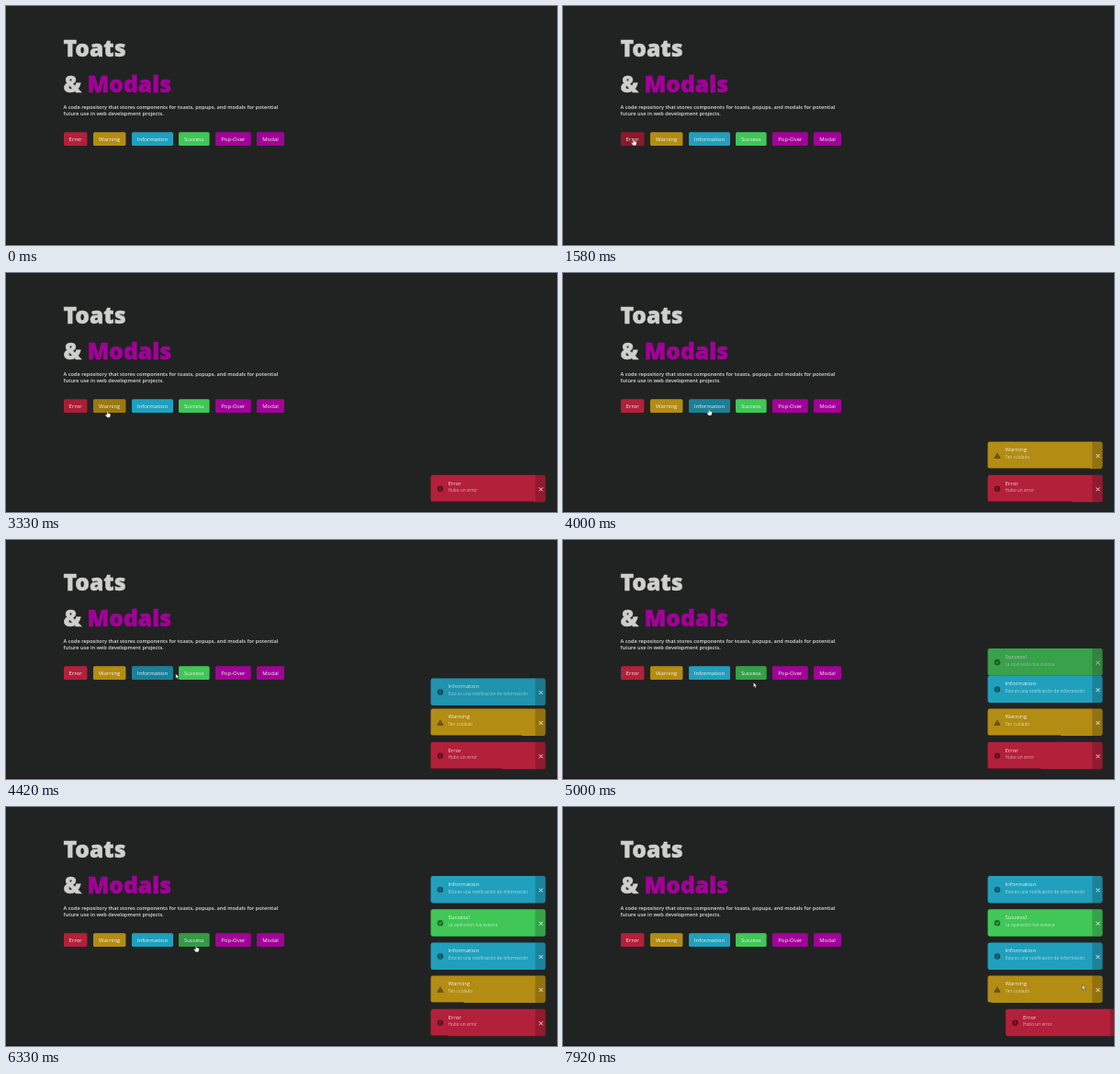
Recreate the animation shown at these times as an HTML page. Size 600 by 260 pixels, loop 8000 ms.

```html
<!DOCTYPE html>
<html lang="en">
<head>
<meta charset="utf-8">
<title>Toats &amp; Modals</title>
<style>
  html, body { margin: 0; width: 100%; height: 100%; overflow: hidden; background: #212322; }
  svg { display: block; width: 100vw; height: 100vh; font-family: "Open Sans", "Noto Sans", sans-serif; }
  .title { font-size: 24.6px; font-weight: 800; fill: #cfcfcd; stroke: #cfcfcd; stroke-width: .5; }
  .title .accent { fill: #a30099; stroke: #a30099; }
  .intro { font-size: 5.62px; font-weight: 600; fill: #dededc; }
  .btn { font-size: 6px; font-weight: 500; fill: #f2f2f2; text-anchor: middle; }
  .head { font-size: 6.1px; fill: #fff; fill-opacity: .88; }
  .body { font-size: 4.75px; fill: #fff; fill-opacity: .62; }
</style>
</head>
<body>
<svg id="stage" viewBox="0 0 600 260">
  <rect width="600" height="260" fill="#212322"/>
  <rect y="258.6" width="600" height="1.4" fill="#1d1b1a"/>
  <text class="title" x="62.5" y="55.4">Toats</text>
  <text class="title" x="62.5" y="94.4">&amp; <tspan class="accent">Modals</tspan></text>
  <text class="intro" x="62.6" y="111.8">A code repository that stores components for toasts, popups, and modals for potential</text>
  <text class="intro" x="62.6" y="119">future use in web development projects.</text>
</svg>
<script>
const LOOP = 8000, STEP = 1000 / 12;
const stage = document.getElementById('stage');

function add(parent, tag, attrs, text) {
  const el = document.createElementNS('http://www.w3.org/2000/svg', tag);
  for (const k in attrs) el.setAttribute(k, attrs[k]);
  if (text) el.textContent = text;
  parent.appendChild(el);
  return el;
}
const clamp = v => Math.max(0, Math.min(1, v));
const RED = '#b3203a', GOLD = '#b38c13', BLUE = '#20a0bd', GREEN = '#40c757', PURPLE = '#a30099';

// Buttons: label, left, width, colour
const buttons = [
  ['Error', 63, 25.4, RED], ['Warning', 95, 35.4, GOLD], ['Information', 137, 45, BLUE],
  ['Success', 188, 33.6, GREEN], ['Pop-Over', 228, 38.8, PURPLE], ['Modal', 273, 30, PURPLE]
].map(([label, x, w, fill]) => {
  const box = { x, y: 137.2, width: w, height: 14.8, rx: 1.6 };
  add(stage, 'rect', { ...box, fill });
  const shade = add(stage, 'rect', box);
  add(stage, 'text', { class: 'btn', x: x + w / 2, y: 147.2 }, label);
  return { x, w, shade };
});

// Toast icons, centred on 0,0
const DISC = 'M-3.3 0a3.3 3.3 0 1 0 6.6 0a3.3 3.3 0 1 0 -6.6 0z';
const icons = {
  Error: DISC + 'M-.4 -1.8h.8v2.2h-.8zM-.4 1h.8v.8h-.8z',
  Warning: 'M0 -3.2L3.7 3.2H-3.7zM-.35 -1h.7v2.1h-.7zM-.35 1.7h.7v.7h-.7z',
  Information: DISC + 'M-.4 -1.8h.8v.8h-.8zM-.4 -.4h.8v2.2h-.8z',
  Success: DISC + 'M-1.9 .1l.6 -.6l.9 .9l1.9 -1.9l.6 .6l-2.5 2.5z'
};
const INFO = 'Esta es una notificación de información';

// Toasts: title, message, colour, top, start, has timer
const toasts = [
  ['Error', 'Hubo un error', RED, 219.8, 2850, true],
  ['Warning', 'Ten cuidado', GOLD, 183.5, 3500, true],
  ['Information', INFO, BLUE, 147.6, 4245, false],
  ['Success', 'La operación fue exitosa', GREEN, 111.2, 4870, false],
  ['Information', INFO, BLUE, 75, 5640, false]
].map(([title, text, fill, top, start, timed]) => {
  const g = add(stage, 'g', {});
  add(g, 'rect', { width: 125, height: 29.5, rx: 2.4, fill });
  add(g, 'path', { d: 'M113.8 0h8.8a2.4 2.4 0 0 1 2.4 2.4v24.7a2.4 2.4 0 0 1 -2.4 2.4h-8.8z', 'fill-opacity': .18 });
  add(g, 'path', { d: icons[title], transform: 'translate(10.4 15)', 'fill-opacity': .48, 'fill-rule': 'evenodd' });
  add(g, 'text', { class: 'head', x: 18.9, y: 10.9 }, title === 'Success' ? 'Success!' : title);
  add(g, 'text', { class: 'body', x: 18.9, y: 18.7 }, text);
  add(g, 'path', { d: 'M118 13.5l4 4m0 -4l-4 4', stroke: '#fff', 'stroke-opacity': .9, 'stroke-width': .9 });
  const bar = timed && add(g, 'rect', { x: .8, y: 28.6, height: 1.1, 'fill-opacity': .5 });
  return { g, bar, top, start };
});

const arrow = add(stage, 'path', {
  d: 'M0 0v5.2l1.2 -1.1l.9 2l.9 -.4l-.9 -1.9h1.7z', fill: '#fff', stroke: '#111', 'stroke-width': .35
});
const hand = add(stage, 'path', {
  d: 'M-.6 .5q.6 -.9 1.2 0v2l2.2 .5q.8 .3 .6 1.2l-.5 2.2q-.2 .8 -1 .8h-1.9q-.6 0 -1 -.6l-1.6 -2.4q.3 -.9 1.1 -.3l.9 .7z',
  fill: '#fff', stroke: '#111', 'stroke-width': .35
});

// Pointer path: time, x, y
const path = [
  [240, 52, 21], [500, 60, 84], [800, 75, 146], [1580, 76.8, 144.6], [1850, 77, 146],
  [2150, 98, 204], [2550, 76, 147], [3000, 77, 147], [3320, 110.5, 150],
  [3550, 111, 149], [3900, 158, 148], [4280, 164, 147], [4417, 184.8, 145.4], [4620, 204, 147],
  [4920, 207, 149], [5000, 207.4, 155], [5350, 164, 149], [5700, 162, 149], [6050, 204, 150],
  [6330, 207, 150.6], [6750, 208, 150], [7500, 520, 188], [7917, 565.5, 193.5], [8000, 566, 194]
];
function pointer(t) {
  let i = path.findIndex(p => p[0] > t);
  if (i === 0) return [-20, -20];
  if (i < 0) i = path.length - 1;
  const [t0, x0, y0] = path[i - 1], [t1, x1, y1] = path[i];
  const p = clamp((t - t0) / (t1 - t0)), e = p * p * (3 - 2 * p);
  return [x0 + (x1 - x0) * e, y0 + (y1 - y0) * e];
}
const inside = (b, [x, y]) => x >= b.x && x <= b.x + b.w && y >= 137.2 && y <= 152;

// Hover shade follows the pointer over the last 300 ms
function hover(b, t) {
  let sum = 0;
  for (let k = 0; k < 15; k++) sum += inside(b, pointer(t - k * 20));
  return sum / 15;
}

function draw(t) {
  for (const b of buttons) b.shade.setAttribute('fill-opacity', .22 * hover(b, t));

  for (const { g, bar, top, start } of toasts) {
    const rest = (1 - clamp((t - start) / 250)) ** 2;
    const out = clamp((t - start - 5000) / 300);
    g.setAttribute('transform', `translate(${462.5 + 138 * out ** 1.3} ${top + 30 * rest})`);
    g.setAttribute('opacity', 1 - rest);
    if (bar) {
      const p = clamp((t - start) / 5000);
      bar.setAttribute('width', 123.4 * (1 - Math.sin(Math.PI / 2 * p ** 1.2)));
    }
  }

  const pos = pointer(t), over = buttons.some(b => inside(b, pos));
  for (const [el, on] of [[hand, over], [arrow, !over]]) {
    el.setAttribute('transform', `translate(${pos[0]} ${pos[1]})`);
    el.setAttribute('visibility', on ? 'visible' : 'hidden');
  }
}

const begin = performance.now();
function tick() {
  const t = (performance.now() - begin) % LOOP;
  draw(Math.floor((t + 4) / STEP) % 96 * STEP);
  requestAnimationFrame(tick);
}
tick();
</script>
</body>
</html>
```
